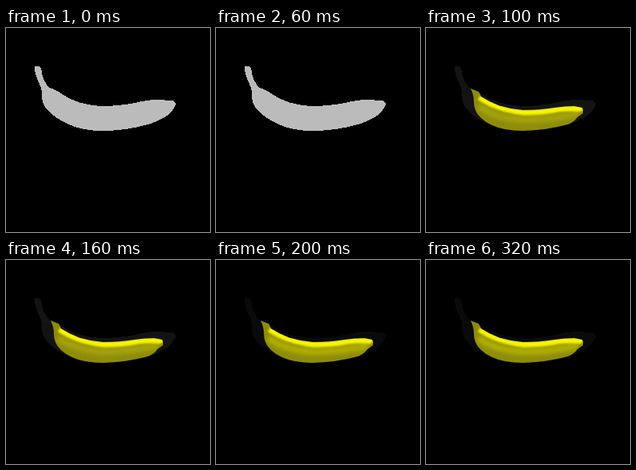
An HTML page for the animation above (400 ms loop, 256 by 256 pixels).

```html
<!DOCTYPE html>
<html lang="en">
<head>
<meta charset="utf-8">
<title>Banana</title>
<style>
  html, body { margin: 0; width: 100%; height: 100%; overflow: hidden; background: #000; }
  svg { display: block; width: 100vw; height: 100vh; }
</style>
</head>
<body>
<svg viewBox="0 0 256 256">
  <defs>
    <clipPath id="body">
      <path shape-rendering="crispEdges" d="M56 76 L66 80 Q68 83 69 86 Q80 93 92 97.500 Q107 102 122 103
        Q143 103 161 100 Q174 98 186 98 L196 100 Q198 103 197 107 L190 112 Q186 118 178 121
        Q150 128.500 121 129 Q98 129 83 122 Q66 114 62 103 Q60 98 60 92 Q60 84 56 76Z"/>
    </clipPath>
    <filter id="soft" x="-20%" y="-50%" width="140%" height="200%"><feGaussianBlur stdDeviation="2"/></filter>
    <filter id="fine" x="-20%" y="-50%" width="140%" height="200%"><feGaussianBlur stdDeviation="1"/></filter>
  </defs>

  <path id="shape" shape-rendering="crispEdges" fill="#bbb" d="M36 48 L42 48 Q45 51 45.500 59 Q47 66 54 75 Q63 77 72 84
    Q90 96 118 98 Q145 98 166 93 Q179 90 190 90 L208 91 Q213 92 213 96 Q210 104 202 110
    Q192 117 178 121 Q150 129 121 129 Q96 129 79 121 Q63 114 53 104 Q46 97 45 87
    Q46 80 43 73 Q38 63 36 53Z"/>

  <g id="fruit" clip-path="url(#body)" fill="none" opacity="0">
    <rect x="50" y="70" width="155" height="65" fill="#8e8c0c"/>
    <path id="middle" d="M66 98 Q86 113 122 115 Q156 115 192 107" stroke="#a3a108" stroke-width="9" filter="url(#soft)"/>
    <path d="M67 87 Q88 102 122 106 Q147 106 165 102 Q181 100 198 102" stroke="#f6f400" stroke-width="7" filter="url(#fine)"/>
    <path d="M55 76 Q61 82 61 96" stroke="#8c8a0c" stroke-width="7" filter="url(#fine)"/>
    <path d="M198 104 L190 114" stroke="#8e8c0c" stroke-width="4" filter="url(#fine)"/>
  </g>
</svg>
<script>
  // Start time, silhouette, fruit opacity, middle tone
  const steps = [
    [0, '#bbbbbb', 0, '#a3a108'],
    [100, '#131313', 1, '#a3a108'],
    [200, '#0a0a0a', 1, '#aeac06']
  ];
  const loop = 400;
  const start = document.timeline.currentTime || 0;

  function play(id, prop, col) {
    const frames = [...steps, [loop, ...steps[2].slice(1)]].map(s => ({
      offset: s[0] / loop, [prop]: s[col], easing: 'steps(1, end)'
    }));
    const anim = document.getElementById(id).animate(frames, { duration: loop, iterations: Infinity });
    anim.startTime = start;
  }

  play('shape', 'fill', 1);
  play('fruit', 'opacity', 2);
  play('middle', 'stroke', 3);
</script>
</body>
</html>
```
